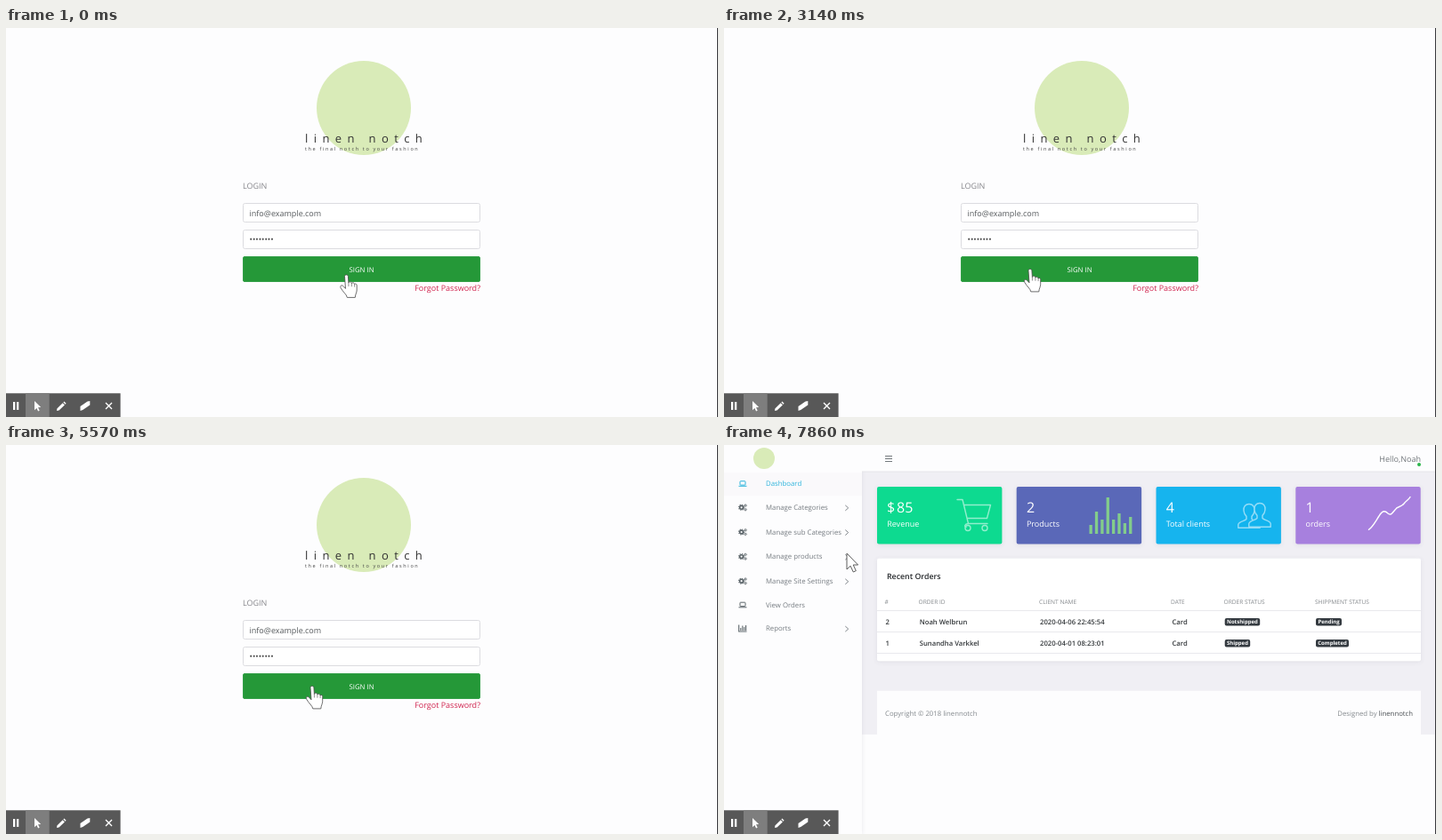
These frames come from a looping animation (800x438 px, 8000 ms). An HTML page:

```html
<!DOCTYPE html>
<html lang="en">
<head>
<meta charset="utf-8">
<title>Shop admin login</title>
<style>
html, body { margin: 0; height: 100%; overflow: hidden; background: #fdfdfe; }
svg { display: block; width: 100vw; height: 100vh; font-family: "Open Sans", sans-serif; }
text { white-space: pre; text-rendering: geometricPrecision; }
</style>
</head>
<body>
<svg viewBox="0 0 800 438">
  <defs>
    <filter id="shade" x="-5%" y="-10%" width="110%" height="120%">
      <feDropShadow dx="0" dy="1" stdDeviation="2" flood-color="#667" flood-opacity=".14"/>
    </filter>
    <g id="cog">
      <circle r="1.9" fill="none" stroke-width="1.6"/>
      <circle r="3" fill="none" stroke-width="1.1" stroke-dasharray="1.2 1.156"/>
    </g>
    <g id="cogs">
      <use href="#cog" x="-1.4"/>
      <use href="#cog" transform="translate(3.1 -2.2) scale(.5)"/>
      <use href="#cog" transform="translate(3.1 2.4) scale(.5)"/>
    </g>
    <g id="laptop" fill="none" stroke-width="1">
      <rect x="-3" y="-2.8" width="6" height="4.4" rx=".6"/>
      <path d="M-4.5 2.8h9"/>
    </g>
    <path id="bars" d="M-4.3 -4V3.5H4.5M-2.2 2.5V-.5M-.2 2.5V-3M1.8 2.5V-1.5M3.6 2.5V-3.5" fill="none" stroke-width="1.1"/>
    <path id="chevron" d="M-1.7 -3L1.7 0L-1.7 3" fill="none"/>
  </defs>
  <rect width="800" height="438" fill="#fdfdfe"/>
  <g id="login"></g>
  <g id="board"></g>
  <path d="M799.5 0V438" stroke="#38383c"/>
  <g id="tools">
    <rect y="411.3" width="128.6" height="26.7" fill="#585858"/>
    <rect x="22" y="411.3" width="26.7" height="26.7" fill="#7e7e7e"/>
    <g fill="#fff">
      <path d="M8 421h2.3v9h-2.3zM12 421h2.3v9h-2.3z"/>
      <path d="M32 420v10.2l2.4-2.2 1.7 3.6 1.6-.8-1.7-3.5 3.2-.4z"/>
      <path d="M57 431l.4-2.6 6.3-6.2 2.2 2.2-6.3 6.2zM64.4 421.5l1-1 2.2 2.2-1 1z"/>
      <path d="M83.5 426l8-5.5 2.8-.6v4.6l-8 5.6-2.8 1z"/>
      <path d="M112 422l7 7M119 422l-7 7" stroke="#fff" stroke-width="1.4"/>
    </g>
  </g>
  <g id="hand" fill="#fff" stroke="#484848" stroke-width=".8" stroke-linejoin="round">
    <path d="M-2 1.6C-2-.6 1.8-.6 1.9 1.6L2.4 9C3 7.2 5.8 7.4 5.9 9.6C6.6 8.2 8.9 8.6 9.1 10.6C10 9.4 11.7 10 11.7 12V17C11.7 20 10 21.6 9.8 25.4H.8C.3 22-3.8 19.4-6.4 14.6C-7.6 12-5 10.9-3.3 12.8L-1 15.4Z"/>
    <path d="M2.4 9V13M5.9 9.6V13.2M9.1 10.6V13.6" fill="none" stroke-width=".6"/>
  </g>
  <path id="arrow" d="M0 0V18L4.1 14.2L7.3 21L10.3 19.6L7.2 13H12.6Z" fill="#fff" stroke="#4a4a4a" stroke-width=".9" stroke-linejoin="round"/>
</svg>
<script>
const $ = id => document.getElementById(id);
const text = (x, y, size, fill, str, more = "") =>
  `<text x="${x}" y="${y}" font-size="${size}" fill="${fill}" ${more}>${str}</text>`;
const rect = (x, y, w, h, fill, more = "") =>
  `<rect x="${x}" y="${y}" width="${w}" height="${h}" fill="${fill}" ${more}/>`;
const use = (id, x, y, ink) => `<use href="#${id}" x="${x}" y="${y}" stroke="${ink}"/>`;
const END = 'text-anchor="end"', MID = 'text-anchor="middle"';
const SEMI = 'font-weight="600"', BOLD = 'font-weight="700"';
const LEAF = "#d9ebb8";

function loginPage() {
  const field = y => rect(266.5, y, 266, 21, "#fff", 'rx="2" stroke="#dcdce0"');
  return `<circle cx="402" cy="90" r="53" fill="${LEAF}"/>` +
    text(336, 129, 13, "#333", "linen notch", 'letter-spacing="6.4"') +
    text(336, 138, 5.5, "#444", "the final notch to your fashion", 'letter-spacing="1.65"') +
    text(266, 181, 9, "#85858a", "LOGIN") +
    field(197.5) + field(227.5) +
    text(273.5, 211.5, 9, "#55595c", "info@example.com") +
    text(273.5, 241, 9, "#444", "••••••••") +
    rect(266.5, 257.5, 266, 28, "#259838", 'rx="1.5" stroke="#33a048"') +
    text(399.5, 274.5, 7.8, "#fff", "SIGN IN", MID) +
    text(533, 295.7, 9, "#d0244f", "Forgot Password?", END);
}

const menu = [
  ["Dashboard", 43.5, "laptop"], ["Manage Categories", 70.3, "cogs"],
  ["Manage sub Categories", 98, "cogs"], ["Manage products", 125.6, "cogs"],
  ["Manage Site Settings", 153.2, "cogs"], ["View Orders", 180, "laptop"],
  ["Reports", 206.5, "bars"]
];
const cards = [
  { x: 172, fill: "#10da90", label: "Revenue", total: 95 },
  { x: 328.7, fill: "#5a67b8", label: "Products", total: 2 },
  { x: 485.5, fill: "#12b4ee", label: "Total clients", total: 4 },
  { x: 642.3, fill: "#a780de", label: "orders", total: 1 }
];
const orders = [
  ["2", "Noah Welbrun", "2020-04-06 22:45:54", "Notshipped", 39.5, "Pending", 29],
  ["1", "Sunandha Varkkel", "2020-04-01 08:23:01", "Shipped", 28.5, "Completed", 37]
];

function sidebar() {
  let out = rect(0, 0, 155, 438, "#fdfdfe", 'filter="url(#shade)"') + rect(0, 31, 155, 26, "#faf9fb");
  menu.forEach(([name, y, icon], i) => {
    const ink = i ? "#757b80" : "#2cb4dc";
    out += text(47, y + 2.8, 7.8, ink, name) + use(icon, 21, y, i ? "#5d666b" : ink);
    if (icon !== "laptop") out += use("chevron", 138, y + .6, "#80868b");
  });
  return out;
}

function cardArt() {
  const bars = [10, 25, 16, 41, 16, 23, 12, 19];
  const person = "c-4 0-6.5 3-6 7.5c.3 3 1.4 5 3 6.4v3c-1.2 2.4-8.5 2.4-9.2 6.2v3.7h24.4v-3.7c-.7-3.8-8-3.8-9.2-6.2v-3c1.6-1.4 2.7-3.4 3-6.4c.5-4.5-2-7.5-6-7.5z";
  return `<g fill="none" stroke="#fff" stroke-width="1.4" stroke-linejoin="round" stroke-linecap="round">
    <g opacity=".55">
      <path d="M262 61.5H268L274.5 88.5H296M269.5 67.5H299.5L295.5 82.5H273"/>
      <path d="M274.5 88.5C270 89 270 92 272 92.5"/>
      <circle cx="274" cy="93.5" r="3"/><circle cx="293" cy="93.5" r="3"/>
      <path d="M590 66.5${person}" fill="#12b4ee"/>
      <path d="M602 65.5${person}" fill="#12b4ee"/>
    </g>
    <path d="M724.5 95.3C729 92 732 86 736 80C740 73 743 74 746 77C750 80 751 76 754 73C757 68 760 71 764 66C767 62 769 62 771 58.5"/>
  </g>` + bars.map((h, i) => rect(410.5 + i * 6.37, 100 - h, 3.3, h, "#83cd8b")).join("");
}

function table() {
  const heads = [["#", 180.5], ["ORDER ID", 218.5], ["CLIENT NAME", 354], ["DATE", 502], ["ORDER STATUS", 561.5], ["SHIPPMENT STATUS", 664]];
  const badge = (x, y, w, str) => rect(x, y, w, 8.6, "#343a40", 'rx="2"') +
    text(x + w / 2, y + 6.5, 6, "#fff", str, `${BOLD} ${MID}`);
  let out = rect(172, 127.7, 611, 115.5, "#fff", 'rx="2" filter="url(#shade)"') +
    text(183, 150.5, 8.8, "#25282b", "Recent Orders", SEMI) +
    heads.map(([str, x]) => text(x, 179, 6.6, "#85898d", str)).join("") +
    `<path d="M172 186.5H783M172 210.5H783M172 234.5H783" stroke="#e9e9ed"/>`;
  orders.forEach(([id, name, date, state, w1, ship, w2], i) => {
    const y = 201.5 + i * 24;
    [[id, 181.5], [name, 219.7], [date, 355], ["Card", 503.5]].forEach(([str, x]) => {
      out += text(x, y, 7.7, "#33373a", str, SEMI);
    });
    out += badge(562.7, y - 6.6, w1, state) + badge(665, y - 6.6, w2, ship);
  });
  return out;
}

function boardPage() {
  return rect(0, 0, 799, 438, "#fdfdfe") + rect(155, 30, 644, 296, "#f0eff4") + sidebar() +
    rect(0, 0, 799, 29.5, "#fdfdfe") +
    `<path d="M155 30H799" stroke="#e6e5ea"/><circle cx="45" cy="15" r="12" fill="${LEAF}"/>
     <path d="M181 12.5h8M181 15.5h8M181 18.5h8" stroke="#72787c"/>` +
    text(783, 18.5, 9, "#71767a", "Hello,Noah", END) +
    `<circle cx="781" cy="22" r="2" fill="#2ab54a"/>` +
    cards.map((c, i) => rect(c.x, 47, 140.4, 64.5, c.fill, 'rx="2" filter="url(#shade)"') +
      (i ? "" : text(183, 76, 16, "#fff", "$")) +
      text(c.x + (i ? 11.2 : 22), 76, 16, "#fff", "1", `id="count${i}"`) +
      text(c.x + 11.2, 91.5, 9, "#fff", c.label)).join("") +
    cardArt() + table() + rect(172, 276.8, 611, 49.2, "#fdfdfe") +
    text(181, 304.5, 7.75, "#84898d", "Copyright © 2018 linennotch") +
    text(774, 304.5, 7.75, "#84898d", 'Designed by <tspan fill="#4b5054">linennotch</tspan>', END);
}

$("login").innerHTML = loginPage();
$("board").innerHTML = boardPage();
const counts = cards.map((c, i) => $("count" + i));

const LOOP = 8000, LOADED = 5710, COUNT_START = 5520, COUNT_TIME = 3000, LEAVE = 7000;
const part = (t, a, b) => Math.min(1, Math.max(0, (t - a) / (b - a)));
const swing = p => .5 - Math.cos(p * Math.PI) / 2;
const mix = (a, b, p) => a + (b - a) * p;
const show = (el, on) => el.setAttribute("visibility", on ? "visible" : "hidden");

function draw(ms) {
  const t = Math.round(Math.floor((ms + 5) * 7 / 1000) * 1000 / 70) * 10;
  const loaded = t >= LOADED;
  show($("login"), !loaded);
  show($("board"), loaded);

  const grown = swing(part(t, COUNT_START, COUNT_START + COUNT_TIME));
  cards.forEach((c, i) => { counts[i].textContent = Math.max(1, Math.ceil(c.total * grown)); });

  const x = mix(382.5, 344, swing(part(t, 0, 1430)));
  const y = mix(278, 271.5, swing(part(t, 0, 1140)));
  const small = t >= 3430 && t < 4710;
  $("hand").setAttribute("transform", `translate(${x} ${y}) scale(${small ? .33 : 1})`);
  show($("hand"), t <= LEAVE);

  const left = 1 - (1 - part(t, LEAVE, 7860)) ** 2;
  $("arrow").setAttribute("transform", `translate(${mix(344, 138, left)} ${mix(271.5, 122, left)})`);
  show($("arrow"), t > LEAVE);
}

const start = performance.now();
function tick() {
  draw((performance.now() - start) % LOOP);
  requestAnimationFrame(tick);
}
tick();
</script>
</body>
</html>
```
